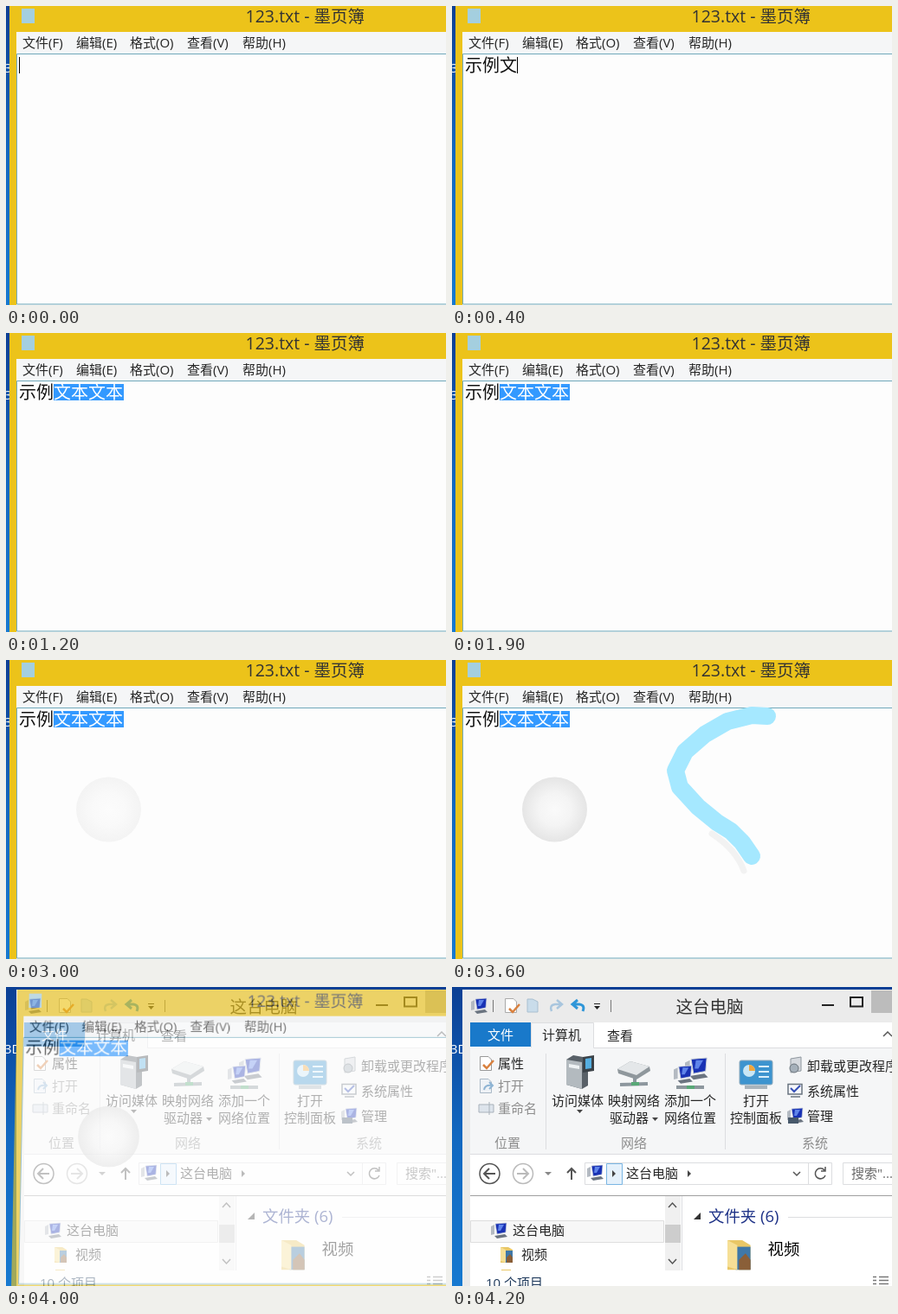
These frames come from a looping animation (508x346 px, 4700 ms). An HTML page:

```html
<!DOCTYPE html>
<html lang="zh-CN">
<head>
<meta charset="utf-8">
<style>
html, body { margin: 0; width: 100%; height: 100%; overflow: hidden; }
svg { position: absolute; left: 0; top: 0; width: 100vw; height: 100vh; }
text { font: 15px "Open Sans", "Noto Sans CJK SC", "Noto Sans CJK", sans-serif; fill: #262626; white-space: pre; }
.title { font-size: 19.5px; fill: #333; }
.body text { font: 300 20px "Noto Sans CJK SC", "Noto Sans CJK", sans-serif; fill: #111; }
.body .sel { fill: #fff; }
.dim text { fill: #8d8d8d; }
.big { font-size: 18.4px; }
.line { fill: none; stroke: #555; stroke-width: 1.5; }
.rule { fill: none; stroke: #dcdde0; }
#editor { overflow: visible; transform-origin: 70% 49.5%; }
</style>
</head>
<body>
<svg id="explorer" viewBox="0 0 508 346">
  <defs>
    <linearGradient id="sky" x2="0" y2="1">
      <stop offset="0" stop-color="#0b3f94"/><stop offset=".5" stop-color="#1268c0"/><stop offset="1" stop-color="#1779d0"/>
    </linearGradient>
    <g id="pc">
      <path d="M0 4L4 2V13L0 14Z" fill="#b4bac2"/>
      <path d="M5 1L18 0L17 11L7 13Z" fill="#1932b4" stroke="#cdd3da" stroke-width=".7"/>
      <path d="M9 2L15 2L11 9H8Z" fill="#5f84ea"/>
      <path d="M4 15L16 13L19 16L7 18Z" fill="#6b7480"/>
    </g>
    <g id="folder">
      <path d="M0 0H9L14 3V18H0Z" fill="#e9c766"/>
      <path d="M5 4H14V18H5Z" fill="#3f78a8"/>
      <path d="M7 12L11 8L14 12V18H7Z" fill="#8a5f38"/>
      <path d="M0 0L6 3V18L0 16Z" fill="#f6df96"/>
    </g>
  </defs>

  <rect width="508" height="346" fill="url(#sky)"/>
  <text x="-2" y="77" style="fill:#fff">3D</text>

  <path d="M12 3H520V360H12Z" fill="#ebebeb"/>
  <use href="#pc" x="22" y="13"/>
  <path d="M47.500 15V29M183.500 15V29" stroke="#777"/>
  <path d="M61.500 13.500H71L74.500 17V29.500H61.500Z" fill="#fff" stroke="#aaa"/>
  <path d="M66 25L70 29L78 20" fill="none" stroke="#d9813f" stroke-width="2.5"/>
  <path d="M87 14H93L99 17V29H87Z" fill="#c9dcea" stroke="#a9bfd0"/>
  <path d="M121 15L127 20L121 25M126 20H119Q112 21 115 28" fill="none" stroke="#a9c6de" stroke-width="2.5"/>
  <path d="M145 15L139 20L145 25M140 20H147Q154 21 151 28" fill="none" stroke="#2f96d8" stroke-width="3"/>
  <path d="M164 19.500H171" stroke="#222"/><path d="M164 22H171L167.500 26Z" fill="#222"/>
  <text class="title" x="258.500" y="30">这台电脑</text>
  <path d="M484 4H508V30H484Z" fill="#bcbcbc"/>
  <path d="M427 21H441M460 12H474V22.500H460Z" class="line" style="stroke:#222;stroke-width:2"/>

  <path d="M21 41H508V346H21Z" fill="#fff"/>
  <path d="M21 70H508V193H21Z" fill="#f5f6f7"/>
  <path d="M21 41H91V69H21Z" fill="#1979ca"/>
  <path class="rule" d="M91.500 70V41.500H163.500V70.500H508M21 193.500H508M108.500 77V188M315.500 77V188"/>
  <path d="M92 42H163V71H92Z" fill="#f5f6f7"/>
  <text x="41" y="60.500" style="fill:#fff">文件</text>
  <text x="104" y="61">计算机</text>
  <text x="179" y="61.500">查看</text>
  <path class="line" d="M498 57L503 52L508 57"/>

  <path d="M32.500 80.500H42L45.500 84V96.500H32.500Z" fill="#fff" stroke="#999"/>
  <path d="M36 90L40 94L48 85" fill="none" stroke="#d9813f" stroke-width="2.500"/>
  <path d="M32.500 106.500H42L45.500 110V122.500H32.500Z" fill="#eef2f6" stroke="#a9b8c6"/>
  <path d="M37 119Q38 113 46 114M43 110L47 114L43 118" fill="none" stroke="#8eb4d4" stroke-width="2"/>
  <path d="M31 136H48V145H31ZM43 133V148" fill="#dde4ec" stroke="#a8b1ba"/>
  <text x="53" y="93.500">属性</text>
  <g class="dim">
    <text x="53" y="119.500">打开</text><text x="53" y="145.500">重命名</text>
    <text x="49" y="185.500">位置</text><text x="195" y="185.500">网络</text><text x="404" y="185.500">系统</text>
  </g>

  <path d="M132 84L140 79L157 82V114L150 118L132 113Z" fill="#596168"/>
  <path d="M132 84L150 87V118L132 113Z" fill="#b3babf"/>
  <path d="M135 89L147 91V95L135 93Z" fill="#eef2f4"/>
  <path d="M151 81L164 79V97L151 99Z" fill="#3b4248"/>
  <path d="M154 83L161 82V94L154 95Z" fill="#55aee0"/>
  <path d="M191 95L206 86L228 92L229 97L213 107L192 100Z" fill="#8f979c"/>
  <path d="M191 95L206 86L228 92L213 102Z" fill="#e4e7e9"/>
  <path d="M194 113L226 112M211 105V111" stroke="#8d979e" stroke-width="4"/>
  <path d="M207 112H216" stroke="#59a877" stroke-width="4"/>
  <use href="#pc" transform="translate(269 82) scale(1.4)"/>
  <use href="#pc" transform="translate(256 91) scale(1.15)"/>
  <path d="M259 116H291" stroke="#8d979e" stroke-width="4"/><path d="M271 116H280" stroke="#59a877" stroke-width="4"/>
  <rect x="332" y="85" width="38" height="28" rx="2" fill="#3d94cf" stroke="#8fa9bb"/>
  <circle cx="343" cy="97" r="7" fill="#c9e6f5"/><path d="M343 97V90A7 7 0 0 1 350 97Z" fill="#f2a63b"/>
  <path d="M354 92H366M354 98H366M354 104H366" stroke="#d9eefa" stroke-width="2"/>
  <path d="M338 116H364" stroke="#a9b4bc" stroke-width="4"/>
  <text x="115" y="136.500">访问媒体</text><path d="M144 142H151L147.500 146Z" fill="#444"/>
  <text x="180" y="136.500">映射网络</text><text x="182" y="157">驱动器</text><path d="M231 151H238L234.500 155Z" fill="#444"/>
  <text x="245" y="136.500">添加一个</text><text x="245" y="157">网络位置</text>
  <text x="336" y="136.500">打开</text><text x="321" y="157">控制面板</text>

  <path d="M391 83L403 81V97L391 99Z" fill="#d5d9de" stroke="#8f979f"/><circle cx="395" cy="94" r="5" fill="#a5b0ba" stroke="#6b747c"/>
  <path d="M388 112.500H404V124H388ZM391 127H402" fill="#f4f6fa" stroke="#6a7480" stroke-width="1.500"/>
  <path d="M391 117L395 121L402 114" fill="none" stroke="#3550b8" stroke-width="2"/>
  <use href="#pc" x="387" y="140"/><path d="M388 151H400V158H388Z" fill="#48596b"/>
  <text x="410" y="96.500">卸载或更改程序</text><text x="410" y="125.500">系统属性</text><text x="410" y="154.500">管理</text>

  <circle class="line" cx="43.500" cy="216" r="11.500"/>
  <path class="line" d="M43 210L37 216L43 222M37 216H50" style="stroke-width:2"/>
  <g style="opacity:.4"><circle class="line" cx="82" cy="216" r="11.500"/><path class="line" d="M82 210L88 216L82 222M88 216H75" style="stroke-width:2"/></g>
  <path d="M107 214H115L111 218Z" fill="#888"/>
  <path class="line" d="M133 215L138 210L143 215M138 210V223" style="stroke-width:2"/>
  <path class="rule" d="M153.500 203.500H438.500V228.500H153.500ZM411.500 204V228M520 203.500H451.500V228.500H520"/>
  <use href="#pc" x="156" y="206"/>
  <path d="M178.500 204.500H196.500V228.500H178.500Z" fill="#e5f1fb" stroke="#7ab6e3"/>
  <path d="M185 212L189 216L185 220ZM272 212L276 216L272 220Z" fill="#444"/>
  <text x="201" y="221">这台电脑</text>
  <path class="line" d="M394 214L398 218L402 214M430 212A6 6 0 1 0 431 218M431 208V213H426"/>
  <text x="461" y="221" style="fill:#6d6d6d">搜索"...</text>

  <path d="M21 241.500H508" stroke="#a0a0a0"/>
  <path d="M21.500 270.500H244.500V295.500H21.500Z" fill="#f7f7f7" stroke="#dedede"/>
  <path d="M246 242H264V328H246Z" fill="#f0f0f0"/><path d="M246 275H264V296H246Z" fill="#cdcdcd"/>
  <path class="line" d="M250 255L254.500 250L259 255M250 315L254.500 320L259 315"/>
  <use href="#pc" x="45" y="273"/><text x="70" y="287">这台电脑</text>
  <use href="#folder" x="56" y="301"/><text x="80" y="314.500">视频</text>
  <path d="M57 327H68V328H57Z" fill="#e9c766"/>
  <path class="rule" d="M265.500 242V328M388 266.500H508"/>
  <path d="M287 261V269H279Z" fill="#333"/>
  <text class="big" x="296" y="272" style="fill:#1e3287">文件夹 (6)</text>
  <use href="#folder" transform="translate(318 293) scale(1.900)"/>
  <text class="big" x="364.500" y="310" style="fill:#000">视频</text>
  <path d="M21 328H508V346H21Z" fill="#fff"/>
  <text x="39" y="347.500" style="fill:#1e395b">10 个项目</text>
  <path d="M486 335.500H490M486 339.500H490M486 343.500H490M493 335.500H504M493 339.500H504M493 343.500H504" stroke="#777" stroke-width="1.500"/>
</svg>

<svg id="editor" viewBox="0 0 508 346">
  <path d="M4 -2H524V350H4Z" fill="#ecc31a"/>
  <path d="M12 30H516V346H12Z" fill="#f5f6f7"/>
  <path d="M12.500 55.500H516V345H12.500Z" fill="#fdfdfd" stroke="#6fa9bb"/>
  <rect x="18" y="3" width="15" height="17" fill="#a4cfdf"/>
  <text class="title" x="276.500" y="18.500">123.txt - 墨页簿</text>
  <g id="menu"></g>
  <g class="body">
    <rect id="mark" x="55" y="59" height="19" fill="#39f"/>
    <text id="head" x="15" y="75.500"></text>
    <text id="picked" class="sel" x="55" y="75.500"></text>
    <text id="tail" y="75.500"></text>
  </g>
  <path id="caret" d="M15.500 59V78" stroke="#000"/>
</svg>

<svg viewBox="0 0 508 346">
  <radialGradient id="puck">
    <stop offset="0" stop-color="#fafafa"/><stop offset=".5" stop-color="#f4f4f4"/><stop offset="1" stop-color="#e5e5e5"/>
  </radialGradient>
  <circle id="touch" cx="118.500" cy="173" fill="url(#puck)"/>
  <g id="gesture" fill="none" stroke-linecap="round" stroke-linejoin="round">
    <path id="ghost" d="M300 201Q328 219 337 244" stroke="#f2f2f2" stroke-width="7"/>
    <path id="trail" pathLength="1" d="M364 65L346 64L318 71L292 86L269 106L258 128L263 147L284 170L306 188L322 198L335 211L346 227" stroke="#a5e8ff" stroke-width="20"/>
  </g>
</svg>
<script>
const $ = id => document.getElementById(id);
const LOOP = 4700, CELL = 20, WORDS = "示例文本文本";
const clamp = v => Math.max(0, Math.min(1, v));
const show = (id, on) => $(id).style.display = on ? "" : "none";

[["文件(F)", 19], ["编辑(E)", 81], ["格式(O)", 143], ["查看(V)", 209], ["帮助(H)", 273]].forEach(([label, x]) =>
  $("menu").insertAdjacentHTML("beforeend", `<text x="${x}" y="48">${label}</text>`));

// [start ms, characters present, characters selected]
const edits = [[0, 0, 0], [200, 1, 0], [300, 2, 0], [400, 3, 0], [500, 4, 0],
  [700, 4, 1], [800, 4, 2], [1000, 5, 3], [1200, 6, 4]];

function drawText(t) {
  const [, count, picked] = edits.findLast(e => t >= e[0]);
  const split = picked ? 2 : count;
  $("head").textContent = WORDS.slice(0, split);
  $("picked").textContent = WORDS.slice(split, split + picked);
  $("tail").textContent = WORDS.slice(split + picked, count);
  $("tail").setAttribute("x", 55 + picked * CELL);
  $("mark").setAttribute("width", picked ? picked * CELL + 1 : 0);
  $("caret").setAttribute("transform", `translate(${count * CELL})`);
  show("caret", !picked);
}

function draw(now) {
  const t = Math.floor(now % LOOP / 100) * 100;
  drawText(t);

  const stroke = 1 - (1 - clamp((t - 3000) / 600)) ** 1.6;
  $("trail").style.strokeDasharray = `${stroke} 2`;
  show("gesture", t > 3000 && t < 3700);
  show("ghost", t >= 3600);

  // The window tips back, shrinks and fades as it closes
  const close = clamp((t - 3700) / 500), ease = close ** 2;
  $("editor").style.transform = close ? `perspective(1000px) rotateX(${9.5 * ease}deg) scale(${1 - 0.045 * ease})` : "none";
  $("editor").style.opacity = 1 - ease;
  show("editor", close < 1);

  $("touch").setAttribute("r", 37.5 - 6 * ease);
  $("touch").style.opacity = t < 3000 ? 0 : clamp(0.4 + (t - 3000) / 800) * (1 - ease);
}

function tick(now) {
  draw(now);
  requestAnimationFrame(tick);
}
draw(0);
requestAnimationFrame(tick);
</script>
</body>
</html>
```
